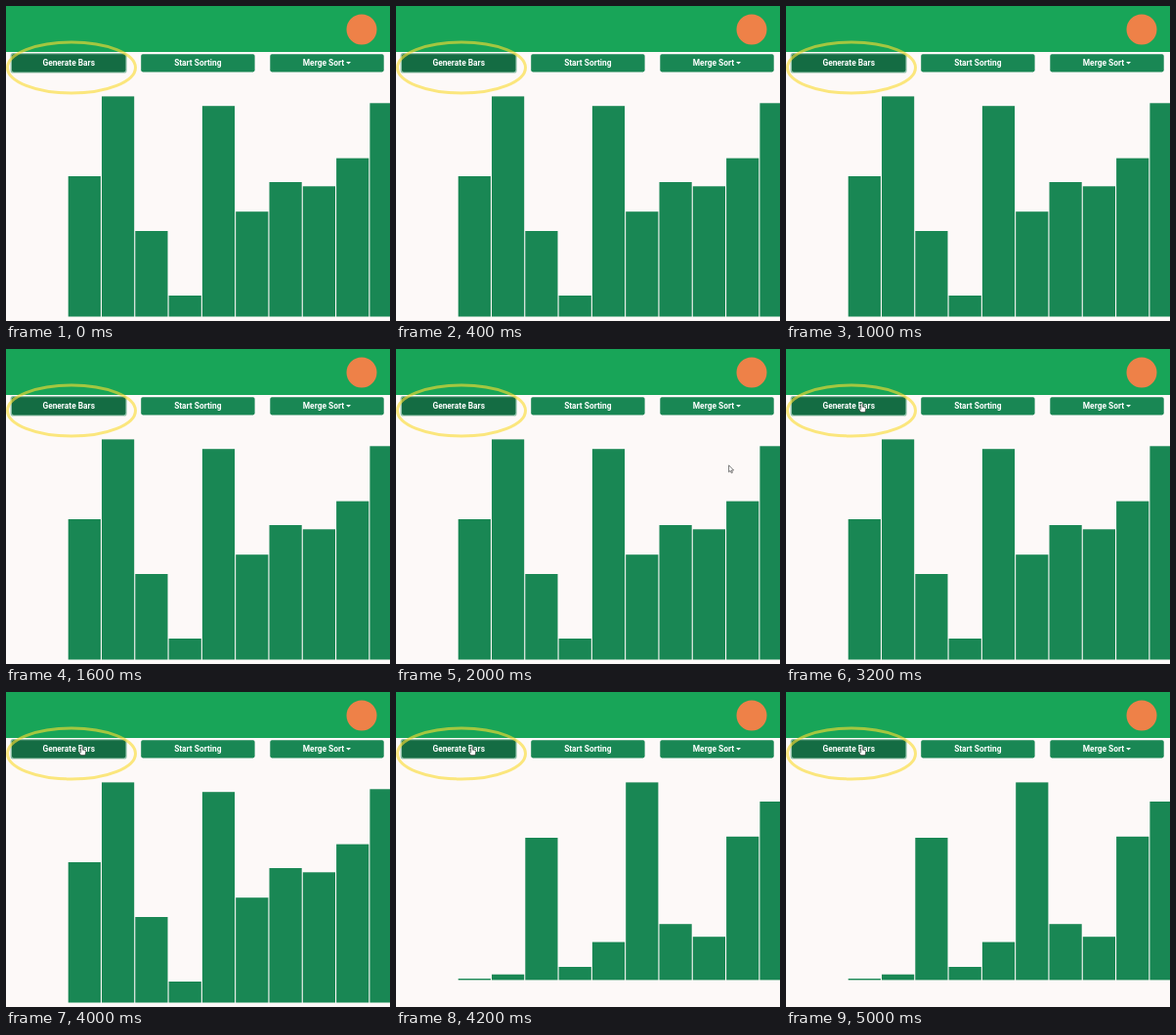
Animation, 393 px wide and 322 px high, one loop 5200 ms. Source, as an HTML page:

```html
<!DOCTYPE html>
<html lang="en">
<head>
<meta charset="utf-8">
<title>Sorting bars</title>
<style>
  html, body { margin: 0; width: 100%; height: 100%; overflow: hidden; background: #fdf9f8; }
  svg { display: block; width: 100vw; height: 100vh; }
  text { font: 700 8.4px Roboto, Arial, sans-serif; fill: #fff; text-anchor: middle; }
</style>
</head>
<body>
<svg viewBox="0 0 393 322">
  <rect width="393" height="322" fill="#fdf9f8"/>
  <rect width="393" height="47" fill="#18a558"/>
  <circle cx="364" cy="24" r="15.5" fill="#ee8148"/>

  <rect x="4.6" y="48" width="119" height="20.6" rx="2.6" fill="#8fc0a8"/>
  <g fill="#198754">
    <rect x="6" y="49.2" width="116.4" height="18.2" rx="1.8" fill="#146c43"/>
    <rect x="138.2" y="49.2" width="116.4" height="18.2" rx="1.8"/>
    <rect x="270.3" y="49.2" width="116.4" height="18.2" rx="1.8"/>
  </g>
  <text x="64.2" y="61.2">Generate Bars</text>
  <text x="196.3" y="61.2">Start Sorting</text>
  <text x="324.9" y="61.2">Merge Sort</text>
  <path d="M348 57h5l-2.5 2.5z" fill="#fff"/>

  <g id="bars" fill="#198754"></g>
  <ellipse cx="67" cy="63" rx="65.5" ry="26" fill="none" stroke="#fadc32" stroke-opacity=".62" stroke-width="3"/>

  <path id="arrow" d="M0 0V7L1.6 5.6 2.7 8 3.8 7.5 2.8 5.2H5z" fill="#fff" stroke="#444" stroke-width=".7"/>
  <path id="hand" d="M-.9 .7Q0-.6.9.7V3.6L3.6 4.2Q4.3 4.5 4.1 5.5L3.4 9H-.9L-3 6Q-2.8 4.8-.9 6z" fill="#fff" stroke="#333" stroke-width=".6"/>
</svg>
<script>
  const LOOP = 5200, STEP = 200, SHUFFLE = 4200;
  const MOVE_START = 2000, MOVE_END = 3000;
  const FROM = [340.6, 118.8], TO = [77.6, 55.6];
  const before = { base: 317.5, tops: [174, 92.4, 230, 296, 102.2, 210.2, 180, 184.3, 155.6, 99.3] };
  const after = { base: 294.4, tops: [293, 288.7, 149, 281, 255.6, 92.4, 237.2, 250.2, 147.8, 112] };

  const $ = id => document.getElementById(id);
  const bars = before.tops.map((_, i) => {
    const bar = document.createElementNS("http://www.w3.org/2000/svg", "rect");
    bar.setAttribute("x", 63.7 + i * 34.3);
    bar.setAttribute("width", 33.2);
    return $("bars").appendChild(bar);
  });

  function place(el, visible, x, y) {
    el.setAttribute("visibility", visible ? "visible" : "hidden");
    el.setAttribute("transform", `translate(${x} ${y})`);
  }

  function draw(time) {
    const t = Math.floor((time % LOOP) / STEP) * STEP;
    const { base, tops } = t < SHUFFLE ? before : after;
    bars.forEach((bar, i) => {
      bar.setAttribute("y", tops[i]);
      bar.setAttribute("height", base - tops[i]);
    });

    const p = Math.min(1, Math.max(0, (t - MOVE_START) / (MOVE_END - MOVE_START)));
    const ease = p * p * (3 - 2 * p);
    const [x, y] = FROM.map((v, i) => v + (TO[i] - v) * ease);
    const overButton = x < 122 && y < 67.4;
    place($("arrow"), t >= MOVE_START && !overButton, x, y);
    place($("hand"), t >= MOVE_START && overButton, x, y);
  }

  const start = performance.now();
  function tick() {
    draw(performance.now() - start);
    requestAnimationFrame(tick);
  }
  tick();
</script>
</body>
</html>
```
